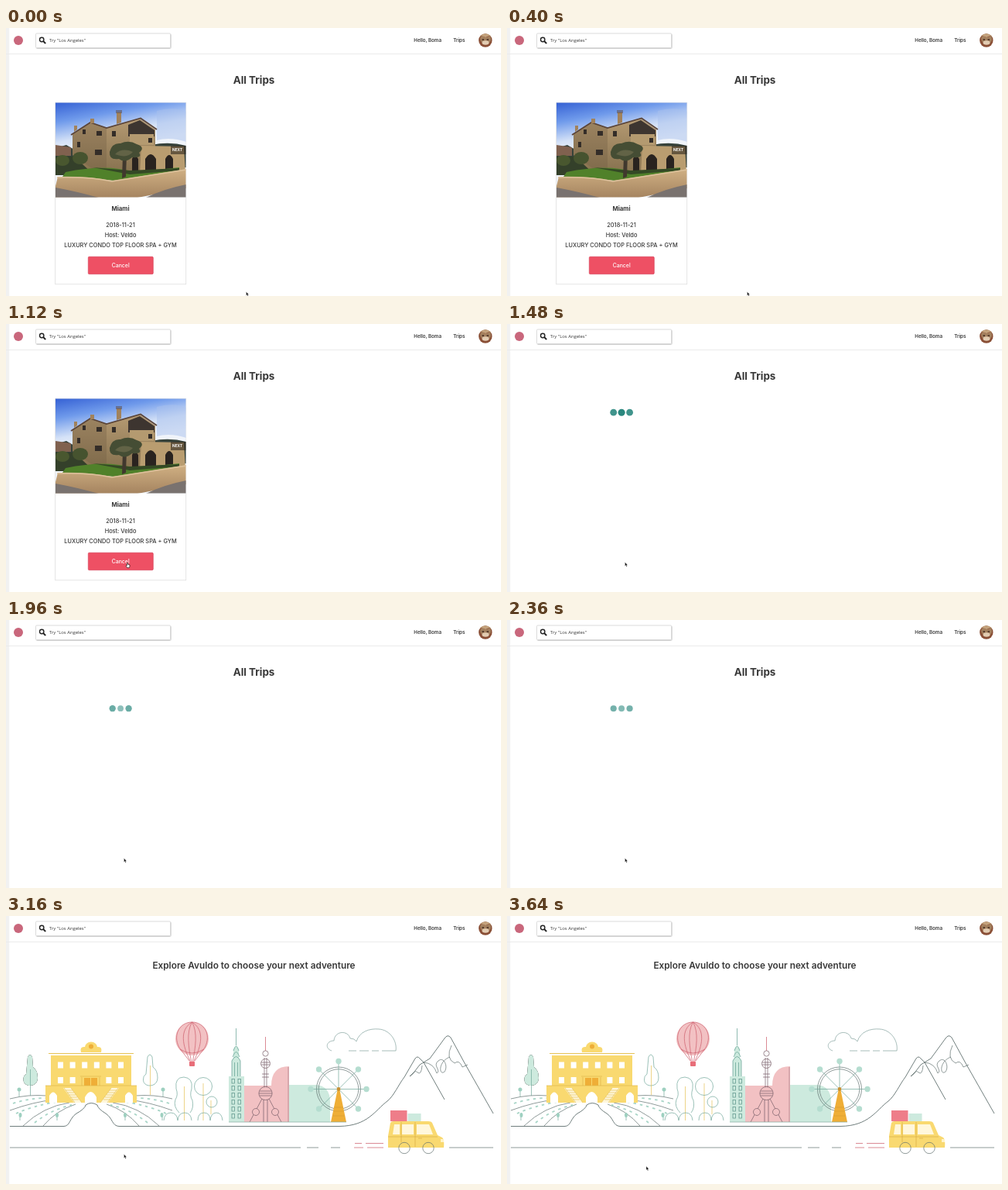
Write an HTML page that moves like this. It is 640 by 346 pixels and loops after 3.68 s.

```html
<!DOCTYPE html>
<html lang="en">
<head>
<meta charset="utf-8">
<title>Trips</title>
<style>
  html, body { margin: 0; width: 100%; height: 100%; overflow: hidden; background: #fff; }
  svg { display: block; width: 640px; height: 346px; }
  text { font-family: Inter, Roboto, sans-serif; fill: #383838; }
  .mid { text-anchor: middle; }
  .line { fill: none; stroke: #60706f; stroke-width: .7; }
  .teal { fill: none; stroke: #70a69a; stroke-width: .7; }
  .red { fill: none; stroke: #cf6472; stroke-width: .75; }
  .gold { fill: none; stroke: #e5c257; stroke-width: .7; }
  .mint { fill: #cdeade; }
  .yellow { fill: #f9d970; }
  .orange { fill: #efae37; }
  .pink { fill: #f2c1c3; }
  .cream { fill: #fff7dc; }
</style>
</head>
<body>
<svg viewBox="0 0 640 346">
  <defs>
    <linearGradient id="sky" x2=".25" y2="1">
      <stop offset="0" stop-color="#3460d4"/>
      <stop offset=".2" stop-color="#6f9aeb"/>
      <stop offset=".4" stop-color="#d5e2f7"/>
      <stop offset=".55" stop-color="#f0f4fa"/>
    </linearGradient>
    <linearGradient id="stone" x2="0" y2="1">
      <stop offset="0" stop-color="#b59a72"/>
      <stop offset="1" stop-color="#86714f"/>
    </linearGradient>
    <linearGradient id="wall" x2="0" y2="1">
      <stop offset="0" stop-color="#d0b083"/>
      <stop offset="1" stop-color="#a58460"/>
    </linearGradient>
    <clipPath id="photo"><rect x="64" y="96.5" width="168.5" height="122"/></clipPath>
    <clipPath id="face"><circle cx="619.8" cy="16" r="8.7"/></clipPath>
    <filter id="shade" x="-5%" y="-20%" width="110%" height="150%">
      <feDropShadow dx=".6" dy=".8" stdDeviation=".7" flood-opacity=".25"/>
    </filter>
  </defs>

  <rect width="640" height="346" fill="#fff"/>
  <rect width="4.3" height="346" fill="#f1f1f1"/>
  <path d="M0 33.5H640" stroke="#ebebeb"/>
  <circle cx="16" cy="16" r="6" fill="#c9677c"/>
  <rect x="38.5" y="7" width="174" height="18.5" rx="1.2" fill="#fff" stroke="#d4d4d4" stroke-width=".8" filter="url(#shade)"/>
  <g fill="none" stroke="#222" stroke-width="1.4">
    <circle cx="46.2" cy="15" r="2.7"/>
    <path d="M48.2 17l3 3" stroke-width="1.8"/>
  </g>
  <text x="56" y="18.2" font-size="5.9" style="font-family:'Open Sans',sans-serif">Try "Los Angeles"</text>
  <g font-size="6.2" font-weight="600">
    <text x="527.3" y="17.9">Hello, Boma</text>
    <text x="578.2" y="17.9">Trips</text>
  </g>
  <g clip-path="url(#face)">
    <rect x="610" y="6" width="20" height="20" fill="#8a4f36"/>
    <path d="M610 6H630V13L625 10L620 12L614 10L610 13Z" fill="#c3a27c"/>
    <path d="M613 13L615 10L619 12H622L626 10L627 14Q627 20 620 20T613 13Z" fill="#a3805e"/>
    <ellipse cx="620" cy="19" rx="4.5" ry="2.8" fill="#e2ccb2"/>
    <path d="M615.500 15h2.500m3.500 0h2.500" stroke="#40291f" stroke-width="1.4"/>
  </g>

  <g id="trips">
    <text class="mid" x="320.5" y="71.6" font-size="13.4" font-weight="700">All Trips</text>
    <g id="card">
      <rect x="63.700" y="96.300" width="169" height="234.500" fill="#fff" stroke="#dedede" stroke-width=".8"/>
      <g clip-path="url(#photo)">
        <rect x="64" y="96" width="169" height="123" fill="url(#sky)"/>
        <path d="M195 107Q217 101 233 108V147Q212 140 195 145Z" fill="#a9c2ee" opacity=".5"/>
        <path d="M64 155L78 151L90 158V187H64ZM188 151Q211 146 233 152V180H188Z" fill="#36423a"/>
        <path d="M64 151L84 154V165H64Z" fill="#80614f"/>
        <path d="M64 166H125V190H64Z" fill="#34402a"/>
        <path d="M86 137L109 122L130 129L173 117L193 131V188H112L86 164Z" fill="url(#stone)"/>
        <path d="M86 137L109 122L130 129V182H112L86 164Z" fill="#6f5c44" opacity=".35"/>
        <path d="M158 125L173 119L192 132V140H158Z" fill="#3d3530"/>
        <path d="M160 137H191V151H160Z" fill="#b49a70"/>
        <path d="M175 152L230 153L232 187H173Z" fill="#b99d70"/>
        <path d="M84 138L109 122L130 129L174 116.500L195 131" fill="none" stroke="#5b4539" stroke-width="1.700"/>
        <path d="M143 124V109H149V122ZM88 134V126H92V131ZM109 123V117H114V123Z" fill="#a1825c"/>
        <path d="M142 109h8m-8-2h8" stroke="#5c473b"/>
        <path d="M99 131h4v6h-4zM117 133h7v6h-7zM92 147h4v7h-4zM115 157h9v7h-9zM137 133h5v7h-5zM184 142h5v6h-5z" fill="#342d28"/>
        <path d="M180 185V169Q187 157 194 169V185ZM206 184V169Q211 159 216 169V182ZM163 186V169Q166 161 171 169V186Z" fill="#29231f"/>
        <path d="M77 186Q130 175 165 186L224 180V188L140 197L73 192Z" fill="#50812a"/>
        <path d="M112 180L160 184L224 181V184L160 189Z" fill="#344925"/>
        <path d="M150 194l1-30 5-2-1 30z" fill="#40382e"/>
        <path d="M134 160Q137 148 148 149Q159 144 169 150Q181 154 172 161Q177 168 163 167Q154 175 146 169Q133 171 134 160Z" fill="#454d34"/>
        <path d="M141 163Q150 154 164 160Q157 169 141 163Z" fill="#626346"/>
        <ellipse cx="73" cy="171" rx="9" ry="7" fill="#49572f"/>
        <ellipse cx="96" cy="168" rx="10" ry="8" fill="#46532f"/>
        <path d="M67 192Q105 191 137 197L233 182V207L170 219H64V204Z" fill="url(#wall)"/>
        <path d="M66 193Q110 192 137 198L233 183" fill="none" stroke="#dcc19b" stroke-width="1.500"/>
        <path d="M64 206Q91 211 120 219H64ZM233 202Q203 208 181 219H233Z" fill="#79726f"/>
        <rect x="213" y="152" width="20" height="11" fill="#30291f" opacity=".6"/>
      </g>
      <text x="215" y="159.200" font-size="4.800" font-weight="700" style="fill:#fff">NEXT</text>
      <g class="mid" font-size="7.400" font-weight="500">
        <text x="148" y="235.700" font-size="7.800" font-weight="700">Miami</text>
        <text x="148" y="257.200">2018-11-21</text>
        <text x="148" y="270.200">Host: Veldo</text>
        <text x="148" y="283.200">LUXURY CONDO TOP FLOOR SPA + GYM</text>
      </g>
      <rect x="106.300" y="295.300" width="84" height="22.400" rx="1.300" fill="#ee5064" stroke="#d9475c" stroke-width=".7"/>
      <text class="mid" x="148.200" y="309.100" font-size="6.900" font-weight="500" style="fill:#fff">Cancel</text>
    </g>
    <g id="loader" fill="#24847b">
      <circle cx="137.7" cy="114.2" r="4.6"/><circle cx="148.1" cy="114.2" r="4.6"/><circle cx="158.6" cy="114.2" r="4.6"/>
    </g>
  </g>

  <g id="explore">
    <text class="mid" x="320.5" y="68" font-size="11.8" font-weight="600">Explore Avuldo to choose your next adventure</text>

    <!-- garden, mirrored around the hotel -->
    <g id="garden">
      <path class="line" d="M5 236Q29 230 53 232M5 251Q35 240 63 237M22 271Q48 246 82 241M48 271Q65 251 90 243"/>
      <path class="teal" d="M9 242Q30 235 53 235M13 255Q35 245 65 240M37 267Q58 250 85 244" stroke-dasharray="3.500 5" style="stroke-width:1.800;stroke:#a8d5c7"/>
      <path class="teal" d="M17 225v8m1 24v7m48-7v7"/>
      <g fill="#9ed0c0"><circle cx="17" cy="224" r="2.5"/><ellipse cx="18.5" cy="257" rx="2" ry="3"/><ellipse cx="66" cy="257" rx="2" ry="3"/></g>
    </g>
    <use href="#garden" transform="matrix(-1 0 0 1 220 0)"/>
    <path id="cypress" d="M28 182Q31 176 34 182L35 195Q41 199 41 209C41 222 22 222 22.5 211Q22 207 26 204Z"/>
    <use href="#cypress" class="mint"/>
    <path class="teal" d="M31.5 198v34"/>
    <use href="#cypress" x="155" class="teal"/>
    <path class="gold" d="M186.5 193v38"/>

    <!-- hotel -->
    <path class="yellow" d="M58 180H162V219H169V241H51V219H58Z"/>
    <path class="gold" d="M55 177.5H165" style="stroke-width:1.2"/>
    <path class="yellow" d="M97 176Q95 168 102 169Q103 163 110 162.5Q117 163 118 169Q125 168 123 176Z"/>
    <circle class="orange" cx="110" cy="168.5" r="3"/>
    <g id="panes" fill="#fff"></g>
    <path class="orange" d="M101 209h8v10h-8zM110 209h8v10h-8z"/>
    <path class="gold" d="M51 219H169M96 207H123M98 208v11m23-11v11" style="stroke:#dfb64c"/>
    <path d="M56 241v-9q5-9 10 0v9zM154 241v-9q5-9 10 0v9zM102 248v-14q7.500-14 15 0v14z" fill="#fff"/>
    <g id="stairs">
      <path d="M74 222L88 241H98L84 222Z" class="cream"/>
      <path class="gold" d="M75 222L89 241M84 222L98 241M77 225h9m-7 3h9m-7 3h9m-7 3h9m-7 3h9"/>
    </g>
    <use href="#stairs" transform="matrix(-1 0 0 1 220 0)"/>

    <!-- ground, road, mountains -->
    <path class="line" d="M5 271.5H75C83 271 82 261 91 255Q102 249 103 244Q110 239 118 244Q119 249 129 255C138 261 137 271 146 271.500H431C468 271 477 251 493 239C501 233 508 217 515 208L529 184Q532 180 535 184L540 189L567 237M522 207Q528 202 535 192L548 184L567 158Q571 152 575 157L593 190L630 255" style="stroke-width:.9"/>
    <path class="line" d="M522 207C529 203 528 198 532 202Q537 206 538 193M540 189Q553 190 557 203C563 199 551 193 559 187C566 181 572 194 567 201C560 207 558 188 574 182M576 167Q568 184 580 190Q586 185 590 195L597 192"/>
    <path class="line" d="M5 299H381m8 0h15m16 0h12m141 0h57"/>
    <path class="red" d="M451 293.500h9m5 0h23M450 299h12m5 0h21"/>

    <!-- cloud and balloon -->
    <path class="teal" d="M421 174C412 171 414 161 424 161C425 148 442 147 445 158Q451 158 453 162C457 149 470 145 482 146C497 147 506 162 504 174H486M443 174h10m4 0h12m4 0h9" style="stroke:#82a19c"/>
    <circle class="pink" cx="240.5" cy="158.500" r="21.5"/>
    <path class="red" d="M237 187L224 170C215 153 225 137 240.500 137S266 153 257 170L244 187M238 187C228 167 224 147 240.500 137C257 147 253 167 243 187M239.500 187C236 170 233 150 240.500 137C248 150 245 170 241.500 187M225 172Q240.500 182 256 172"/>
    <rect x="237" y="187.500" width="7" height="6.500" rx="1" fill="#e86d78"/>

    <!-- park -->
    <path class="gold" d="M230.500 220v44M255 216v48M265 238v18"/>
    <path class="teal" d="M224 254Q216 246 219 237Q223 231 220 223Q218 208 230 208Q242 209 240 223Q237 232 241 238Q243 248 238 254"/>
    <circle class="teal" cx="255" cy="220" r="11.5"/><circle class="teal" cx="266" cy="240" r="7"/>
    <path class="teal" d="M204 264q1-10 9-10t9 10q1-10 9-10t9 10m8 0q0-10 8-10t8 10q1-10 8-10t8 10"/>

    <!-- skyline -->
    <path class="mint" d="M288 266V207H292V186L294 184V173Q297.500 163 301 173V184L303 186V207H308V266Z"/>
    <path class="line" d="M297.500 145V167M292 187Q297.500 176 303 187M293 182Q297.500 169 302 182M294 174Q297.500 162 301 174M292 187V207M303 187V207M295.500 189v18m4-18v18" style="stroke:#5f9c90"/>
    <g id="tower" class="line" style="stroke:#568f85"></g>
    <path class="pink" d="M308 266V219H343Q343 194 366 194V266Z"/>
    <path class="mint" d="M366 266V218H400Q419 219 419 240V266Z"/>
    <path class="line" d="M365 195V266" style="stroke:#a87982"/>
    <path class="red" d="M335.500 156V174"/>
    <g class="line" style="stroke:#785d67">
      <path d="M334 183v38m3-38v38M333 237v29m5-29v29M331 236L315 266M340 236L356 266M328 226h15m-16 3h17m-16 3h15M330 189h11m-11 3h11M331 204h9m-9 4h9"/>
      <circle cx="335.500" cy="177.500" r="3.6"/><circle cx="335.500" cy="190.500" r="6"/><circle cx="335.500" cy="229" r="8.6"/>
      <circle class="pink" cx="323" cy="253" r="4.500"/><circle class="pink" cx="348" cy="253" r="4.500"/>
    </g>

    <!-- ferris wheel -->
    <g id="wheel"><circle class="line" cx="430" cy="223.500" r="28.5"/><circle class="line" cx="430" cy="223.500" r="25.8"/></g>
    <path class="orange" d="M428.500 225H431.500L440 266H420Z"/>
    <path d="M424.500 247h11m-12 5h13m-14.500 6h16" stroke="#d59a31" stroke-width=".6"/>
    <circle cx="430" cy="223.500" r="2.400" fill="#c79134"/>
    <path class="line" d="M288 266H440" style="stroke:#83aaa0"/>

    <!-- car -->
    <rect x="497" y="251" width="21.500" height="14" fill="#ee7d89"/>
    <rect class="mint" x="519.500" y="255" width="17" height="10"/>
    <path class="yellow" d="M494 299V284L497 267Q498 265 501 265H546Q550 265 551 267L558 283L564 286Q567 289 566 299Z"/>
    <path class="cream" d="M500 282L502 269H509V282ZM512 269H527V282H512ZM531 269H547L552 282H531Z"/>
    <path class="gold" d="M494 285H558M529 266V298M511 266V292M533 287h5" style="stroke:#d8ad42"/>
    <rect x="562" y="288" width="4" height="4" fill="#fff3c7"/>
    <g class="line"><circle cx="515" cy="299.500" r="7.2"/><circle cx="546" cy="299.500" r="7.2"/></g>
  </g>

  <g id="pointer">
    <path id="arrow" d="M0 0V5L1.100 4.100L1.900 6L2.800 5.600L2 3.800H3.500Z" fill="#111" stroke="#fff" stroke-width=".35"/>
    <path id="hand" d="M-.7 .5Q0-.5 .6 .5V2.300L3 3V5L2.300 6.700H-.3L-1.800 4.300L-1.400 3.600L-.7 4Z" fill="#fff" stroke="#111" stroke-width=".65"/>
  </g>
</svg>

<script>
const $ = id => document.getElementById(id);
const LOOP = 3680, STEP = 40;
const LOAD = 1440, BEAT = 1470, HOME = 2400;

function add(parent, tag, attrs) {
  const el = document.createElementNS('http://www.w3.org/2000/svg', tag);
  for (const key in attrs) el.setAttribute(key, attrs[key]);
  $(parent).append(el);
}
const box = (parent, x, y, width, height) => add(parent, 'rect', { x, y, width, height });

for (let i = 0; i < 6; i++) {
  const x = 67 + i * 15.6;
  box('panes', x, 188.5, 7, 8);
  if (i < 2 || i > 3) box('panes', x, 208, 7, 8);
  for (const col of [292, 300]) box('tower', col, 210.5 + i * 9, 3.5, 5.5);
}
for (let i = 0; i < 8; i++) {
  const a = i * Math.PI / 4, c = Math.cos(a), s = Math.sin(a);
  add('wheel', 'path', { class: 'teal', d: `M430 223.5L${430 + 33 * c} ${223.5 + 33 * s}` });
  add('wheel', 'circle', { cx: 430 + 36 * c, cy: 223.5 + 36 * s, r: 3.7, fill: '#b5ddd0' });
}

// start, end, from, to
const moves = [
  [420, 960, [310.5, 340.5], [157, 308]],
  [1240, 1400, [157, 308], [152.5, 307.5]],
  [3360, 3600, [152.5, 307.5], [180, 323]]
];
function pointerAt(t) {
  let pos = moves[0][2];
  for (const [start, end, from, to] of moves) {
    if (t < start) break;
    const p = Math.min(1, (t - start) / (end - start));
    const k = Math.sin(p * Math.PI / 2) ** 1.3;
    pos = from.map((v, i) => v + (to[i] - v) * k);
  }
  return pos;
}

const dots = [...$('loader').children];
function beat(t) {
  dots.forEach((dot, i) => {
    const outer = i !== 1;
    const phase = Math.max(0, t - BEAT - (outer ? 350 : 0)) / 700 % 1;
    const dip = Math.max(outer ? .16 : 0, 1 - Math.abs(1 - 2 * phase));
    dot.setAttribute('opacity', 1 - .8 * dip);
    dot.setAttribute('r', 4.6 * (1 - .25 * dip));
  });
}

const show = (id, on) => { $(id).style.display = on ? '' : 'none'; };
function draw() {
  const t = Math.floor(performance.now() % LOOP / STEP) * STEP;
  show('trips', t < HOME);
  show('card', t < LOAD);
  show('loader', t >= LOAD);
  show('explore', t >= HOME);
  beat(t);
  const [x, y] = pointerAt(t);
  const over = x > 106 && x < 190 && y < 318 && t < LOAD - 80;
  show('hand', over);
  show('arrow', !over);
  $('pointer').setAttribute('transform', `translate(${x} ${y})`);
  requestAnimationFrame(draw);
}
draw();
</script>
</body>
</html>
```
